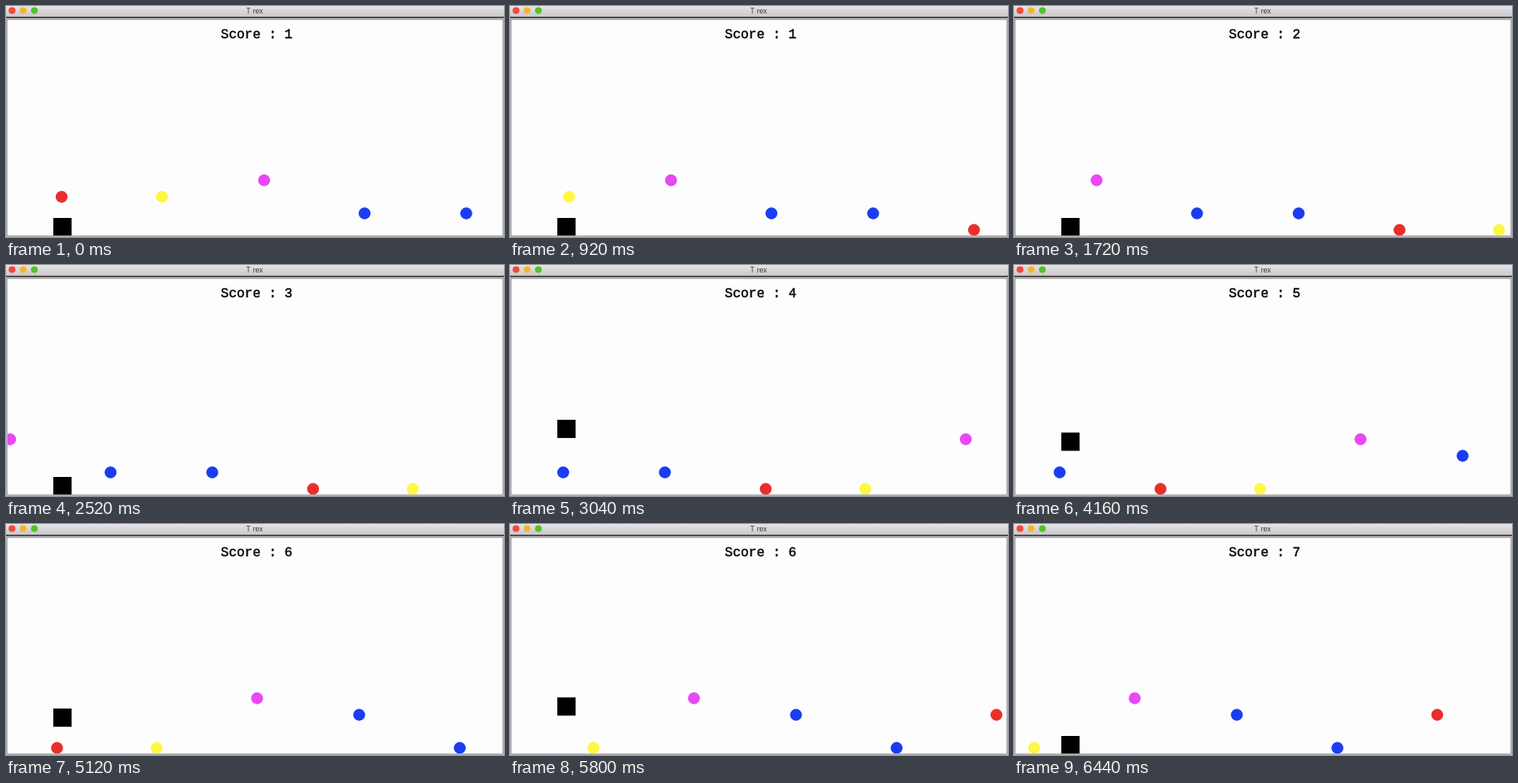
Write an HTML page that moves like this. It is 600x279 px and loops after 6480 ms.

```html
<!DOCTYPE html>
<html lang="en">
<head>
<meta charset="utf-8">
<title>T rex</title>
<style>
  html, body { margin: 0; width: 100%; height: 100%; overflow: hidden; background: #fefdfe; }
  svg { display: block; width: 600px; height: 279px; }
  .title { font: 8.6px Inter, "Liberation Sans", sans-serif; fill: #3c3c3c; }
  .score { font: 16px "Liberation Mono", "Courier New", monospace; fill: #000; stroke: #000; stroke-width: .4px; white-space: pre; }
</style>
</head>
<body>
<svg viewBox="0 0 600 279">
  <defs>
    <linearGradient id="bar" x2="0" y2="1">
      <stop offset="0" stop-color="#e6e4e6"/>
      <stop offset="1" stop-color="#c9c7c9"/>
    </linearGradient>
    <clipPath id="field"><rect x="2" y="16" width="596" height="261.3"/></clipPath>
  </defs>
  <rect width="600" height="279" fill="#fefdfe"/>
  <rect width="600" height="13" fill="url(#bar)"/>
  <rect y="13" width="600" height="1.6" fill="#2c2c2c"/>
  <rect x="1" y="16" width="598" height="262" fill="none" stroke="#8c8c8c" stroke-width="1.3"/>
  <circle cx="7.3" cy="5.5" r="4.1" fill="#f1493f"/>
  <circle cx="20.7" cy="5.5" r="4.1" fill="#f5b52e"/>
  <circle cx="34.2" cy="5.5" r="4.1" fill="#52c22b"/>
  <text class="title" x="299.5" y="9" text-anchor="middle">T rex</text>
  <text class="score" id="score" x="302" y="39" text-anchor="middle"></text>
  <g clip-path="url(#field)">
    <g id="balls"></g>
    <rect id="player" x="57" width="22" height="22"/>
  </g>
</svg>
<script>
const LOOP = 6480, TICK = 40;
const PLAYER_X = 68, GROUND = 256;
const JUMP_HEIGHT = 75, JUMP_TIME = 640;
const RED = '#ea2f2b', YELLOW = '#fff743', PINK = '#e649f5', BLUE = '#1a3df2';

// Distance scrolled at a given time.
const scroll = [[0, 0], [920, 117], [2520, 306], [3520, 425], [4160, 499.5], [5120, 614.5], [6480, 776.3]];

// Position along the track, height, colour.
const track = [
  [67, 230.5, RED], [188, 230.5, YELLOW], [311, 210.5, PINK],
  [432, 250.5, BLUE], [554.5, 250.5, BLUE],
  [676, 270.5, RED], [796, 270.5, YELLOW], [917, 210.5, PINK],
  [1040, 230.5, BLUE], [1161.2, 270.5, BLUE], [1281.5, 230.5, RED]
];

const jumps = [2630, 3669, 4561, 5677];

const byId = id => document.getElementById(id);
const score = byId('score'), player = byId('player');

const balls = track.map(([x, y, fill]) => {
  const dot = document.createElementNS('http://www.w3.org/2000/svg', 'circle');
  dot.setAttribute('r', 7.2);
  dot.setAttribute('cy', y);
  dot.setAttribute('fill', fill);
  byId('balls').append(dot);
  return { x, dot };
});

function distance(t) {
  const i = scroll.findIndex(([time]) => time > t);
  const [t0, d0] = scroll[i - 1], [t1, d1] = scroll[i];
  return d0 + (d1 - d0) * (t - t0) / (t1 - t0);
}

function lift(t) {
  const start = jumps.find(s => t >= s && t < s + JUMP_TIME);
  if (start === undefined) return 0;
  const u = (t - start) / JUMP_TIME;
  return 4 * JUMP_HEIGHT * u * (1 - u);
}

function draw(t) {
  const d = distance(t);
  let passed = 0;
  for (const { x, dot } of balls) {
    const cx = x - d;
    if (cx < PLAYER_X) passed++;
    dot.setAttribute('cx', cx);
    dot.setAttribute('visibility', cx > -3 && cx < 606 ? 'visible' : 'hidden');
  }
  player.setAttribute('y', GROUND - lift(t));
  score.textContent = 'Score : ' + passed;
}

const begin = performance.now();
function frame() {
  const t = (performance.now() - begin) % LOOP;
  draw(Math.floor(t / TICK) * TICK);
  requestAnimationFrame(frame);
}
frame();
</script>
</body>
</html>
```
